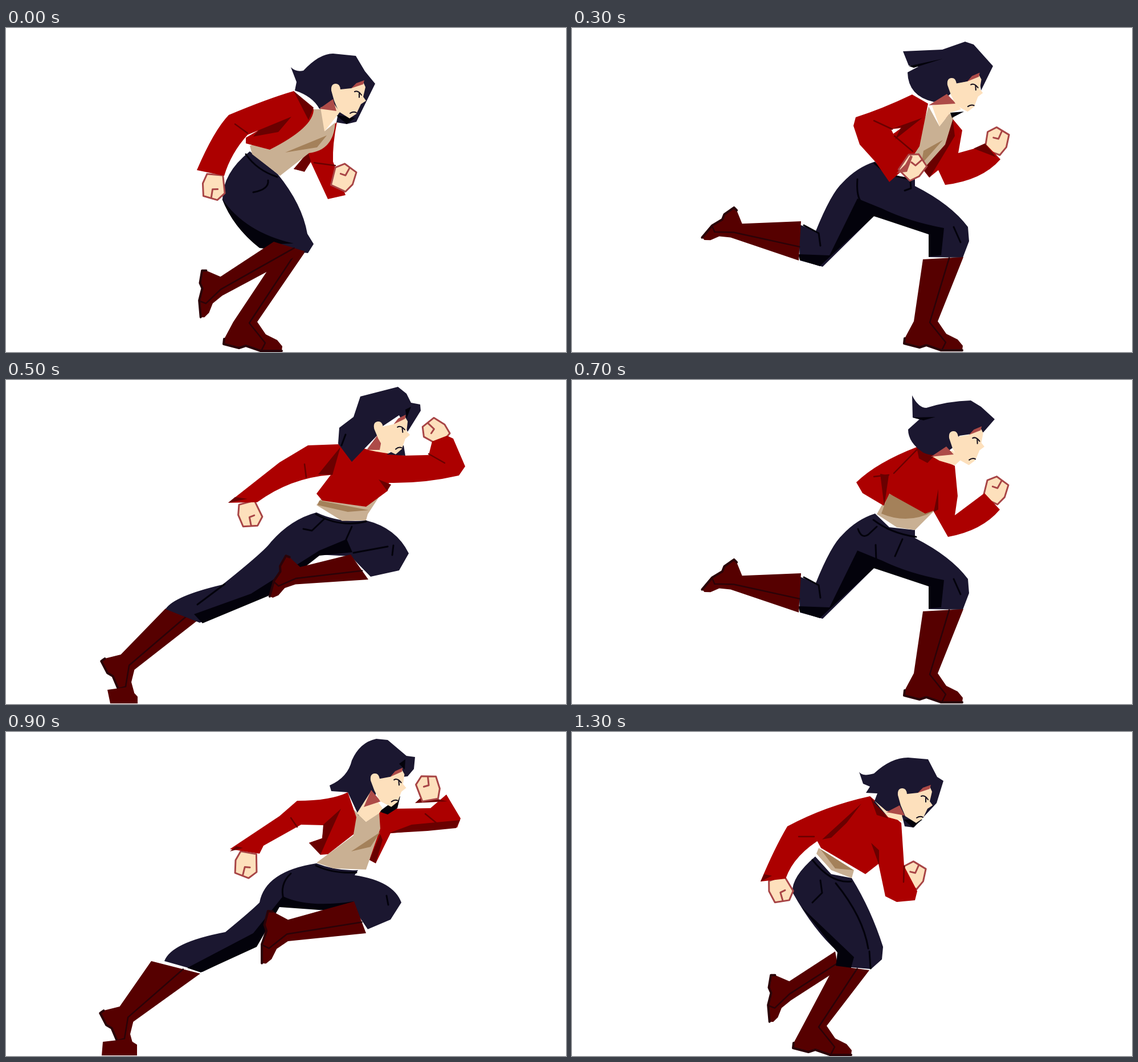
Animation, 983 px wide and 570 px high, one loop 1400 ms. Source, as an HTML page with a canvas:

```html
<!DOCTYPE html>
<html lang="en">
<head>
<meta charset="utf-8">
<title>Run cycle</title>
<style>
html, body { margin: 0; width: 100%; height: 100%; overflow: hidden; background: #fff }
canvas { display: block }
</style>
</head>
<body>
<canvas id="stage" width="983" height="570"></canvas>
<script>
const ctx = document.getElementById('stage').getContext('2d');

const fill = color => path => {
  ctx.fillStyle = color;
  ctx.fill(new Path2D(path));
};
const stroke = (color, width) => path => {
  ctx.strokeStyle = color;
  ctx.lineWidth = width;
  ctx.stroke(new Path2D(path));
};
const navy = fill('#1b1730'), dark = fill('#03020b'), red = fill('#ac0000'), shade = fill('#6a0000');
const leather = fill('#560000'), skin = fill('#fde0bc'), blush = fill('#ad4b48');
const shirt = fill('#c9b093'), tan = fill('#a4815a'), white = fill('#fff');
const line = stroke('#03020b', 3), pen = stroke('#120d1c', 2), fold = stroke('#6a0000', 2.5);
const seam = stroke('#2a0308', 2.5), sole = stroke('#2a0308', 4), knuckle = stroke('#a84546', 3);

function place(x, y, deg, paint) {
  ctx.save();
  ctx.translate(x, y);
  ctx.rotate(deg * Math.PI / 180);
  paint();
  ctx.restore();
}

// A face hung on the ear.
function head(x, y, deg) {
  place(x, y, deg, () => {
    skin('M-8 2Q-9-10 0-10 7-10 8 0L27-2 48-13 52-4 48 13 53 20 44 26 36 43 24 51 5 39-3 20Z');
    blush('M27-2L36-11 50-16 48-9Z');
    pen('M33 4Q39 1 45 10M41 7V14M25 42Q31 38 36 41');
  });
}

// A fist whose wrist is at its left when deg is 0.
function fist(x, y, deg) {
  place(x, y, deg, () => {
    const hand = 'M-21-14L10-20 23-8 18 17-4 20-21 14Z';
    skin(hand);
    knuckle(hand + 'M20 3L5 2 4-7');
  });
}

// back, front: ends of the top edge; the foot turns about the ankle.
function boot(back, front, ankle, deg = 0, size = 1) {
  const a = deg * Math.PI / 180, c = Math.cos(a) * size, s = Math.sin(a) * size;
  const at = ([x, y]) => [ankle[0] + x * c - y * s, ankle[1] + x * s + y * c];
  const heel = [[-38, 30], [-39, 39], [-12, 46], [0, 42], [26, 51], [63, 51]].map(at);
  const toe = [[64, 43], [55, 32], [35, 22], [20, 0]].map(at);
  const mid = back.map((v, i) => v * .35 + front[i] * .65);
  leather('M' + [back, at([-22, 0]), ...heel, ...toe, front].join('L') + 'Z');
  sole('M' + heel.join('L'));
  seam('M' + [mid, at([6, 2]), at([34, 37]), at([28, 49])].join('L'));
}

function passOpen() {
  boot([480, 395], [527, 391], [421, 517]);
  navy('M428 217L477 257Q520 310 529 362L540 380 530 396 445 386Q403 355 380 302 380 255 428 217Z');
  dark('M379 300Q420 360 505 379L480 380 494 393 445 387Q398 350 379 300Z');
  line('M421 222Q440 250 476 262M460 268Q462 284 434 289');
  boot([470, 376], [525, 393], [378, 455], 85, .8);
  red('M581 165Q573 205 574 235L596 294 565 301 535 236 524 252 505 248Z');
  shade('M505 248L530 218 535 234 524 253Z');
  shirt('M540 143H555L560 181 578 166Q575 215 532 220L481 260 432 222 428 207 500 185Z');
  tan('M490 219L563 189 546 210Z');
  fist(365, 279, 95);
  fist(592, 263, -65);
  red('M505 111Q460 124 391 153 365 180 335 250L383 260Q395 220 424 188L443 180 421 193V203L463 214Q540 175 540 143Z');
  shade('M443 180L501 156 478 183 434 191Z');
  shade('M505 111L540 140 531 162Z');
  fold('M402 169L424 185M541 237L578 242');
  navy('M500 69Q509 78 522 75 550 45 574 45L614 49 630 76 648 98 615 165 598 169 580 166 583 150 550 142Q538 120 507 110L510 95Z');
  dark('M579 153L613 158 598 169Z');
  skin('M552 140L575 132 586 148 559 182Z');
  blush('M550 142L574 125 580 146Z');
  head(579, 108, 0);
}

function passClosed() {
  boot([462, 386], [468, 418], [383, 456], 85, .8);
  navy('M427 219L455 250 491 257Q525 312 546 378L544 400 525 417 465 412 466 386Q425 350 387 282 385 255 427 219Z');
  dark('M402 307L495 396 489 418 463 413 466 388Z');
  line('M422 225Q455 267 490 263M436 261L439 283 422 300M463 266Q511 325 520 381M522 386L524 416');
  boot([461, 411], [522, 419], [427, 517]);
  fist(599, 252, -70);
  fist(366, 277, 70);
  shirt('M433 204L495 243 491 257 455 243 429 214Z');
  tan('M436 206L494 243 462 240Z');
  red('M523 113Q445 130 378 166 355 205 331 263L375 258Q390 215 442 185L430 191 437 204 515 250 538 232 550 289 570 299 602 296 606 280 583 236 578 160Z');
  shade('M508 126L439 189 455 186 482 160Z');
  shade('M331 263L337 250 351 253Z');
  shade('M523 113L555 152 535 146Z');
  shade('M525 195L539 208V234Z');
  fold('M398 184H425M583 236L582 264');
  navy('M504 70Q509 79 530 73 560 45 590 45L625 48 641 79 652 86 640 125 600 168 584 166 580 150 552 147 530 124 536 108 516 107 523 96 511 91Z');
  dark('M582 154L615 154 598 168Z');
  skin('M531 121L552 139 579 139 580 157 555 150Z');
  blush('M552 141L575 129 584 147Z');
  head(580, 109, 0);
}

function landLegs() {
  navy('M532 235L557 259 602 264V278Q665 310 695 350L697 375 686 404 626 403V361Q570 342 530 331L440 420 400 409 397 345 428 357Q455 290 475 272 500 245 532 235Z');
  dark('M501 300L545 318Q590 340 653 352L648 400 626 402V363L530 331 435 419 400 408 397 398 452 400Z');
  line('M407 347L433 361 436 383M670 350L682 377');
  boot([402, 340], [398, 409], [288, 357], 130, .75);
  boot([616, 407], [687, 403], [622, 516]);
}

function airLegs() {
  navy('M508 208L540 238 578 240Q660 245 712 275L735 300 722 325 690 330Q600 318 525 306L350 388 325 345 400 305Q450 230 508 208Z');
  dark('M488 286Q610 312 702 312L690 330Q600 318 525 306L350 388 343 374Z');
  line('M690 279L710 296M390 314L360 337');
  boot([688, 326], [730, 293], [761, 385], -30, .8);
  boot([326, 343], [352, 388], [216, 415], 125, .75);
}

function landOpen() {
  line('M501 266Q499 292 506 304M531 238L552 256M566 260L596 267M594 270L595 282 584 286');
  fist(745, 199, -70);
  red('M660 150L685 180 678 220 728 206 752 231Q720 268 655 276L643 250 627 263 617 250Z');
  shade('M668 158L672 190 628 263 617 250Z');
  shade('M705 212L725 203 744 227Z');
  shirt('M626 138L645 173 663 150 670 156 655 205 617 248 600 222Z');
  tan('M617 216L651 197 613 240Z');
  red('M597 117Q545 142 498 157L494 172 505 205 533 236 557 271 585 246 610 208 625 133Z');
  white('M560 178L578 176 564 186Z');
  shade('M615 158L567 196 578 174 560 178Z');
  fold('M530 163L562 178M566 190L598 217');
  fist(598, 244, -45);
  blush('M585 240L594 224 598 226 588 253 570 255Z');
  navy('M581 41L650 38 690 24 705 29 739 67 718 110 715 90 676 98Q665 125 635 130 590 120 589 78L608 68 591 66Z');
  dark('M591 67L651 54 600 70Z');
  dark('M664 149L688 147 667 158Z');
  skin('M632 137L669 126 683 143 664 149 645 173Z');
  blush('M626 136L658 116 674 133Z');
  head(667, 98, -4);
}

function landClosed() {
  line('M529 246Q560 270 604 276M502 262Q508 280 520 272L535 258M580 280L567 310M533 290L534 318');
  shirt('M555 200L600 228 634 232 602 264 570 259 535 236Z');
  tan('M556 200L635 231Q590 255 543 235Z');
  fist(743, 194, -65);
  red('M605 118L672 151 677 204 672 238 724 199 751 228Q720 265 660 276L634 230 620 235 557 200 547 221 510 199 499 180Q535 145 605 118Z');
  shade('M605 118L639 130 624 146 609 138Z');
  shade('M541 165L556 168 548 222Z');
  shade('M643 192V228L635 232Z');
  fold('M606 122L565 164M530 170L556 167');
  navy('M597 27Q608 49 622 49 660 37 700 36L718 47 742 69 722 92 680 98 672 116Q645 140 617 128 590 110 590 87L610 69 598 66Z');
  dark('M598 66L638 65 617 71Z');
  skin('M633 135L668 124 683 140 672 150 645 142Z');
  blush('M630 135L657 117 670 131Z');
  head(670, 100, -3);
}

function pushOpen() {
  boot([255, 403], [341, 425], [212, 497], 48, .85);
  leather('M170 545L214 540 230 550V569H168Z');
  navy('M545 231Q580 245 618 243L612 252Q680 262 694 300L675 330 635 347 618 322 480 302 440 375 345 422 278 403Q290 370 385 352 430 315 445 300 455 245 545 231Z');
  dark('M318 415L434 354 486 289Q530 310 610 298L618 318 480 308 440 378 342 423Z');
  line('M500 249Q479 268 488 297M544 235Q575 250 615 247M668 288L671 304');
  boot([611, 298], [632, 354], [495, 350], 90, .9);
  red('M655 140L680 135 745 134 773 110 798 152 792 168 675 178 649 231 638 225Z');
  shade('M672 178L712 163 797 155 790 169 740 174Z');
  shade('M657 180L661 190 649 231 638 225Z');
  shade('M718 125L732 112 775 122Z');
  fist(741, 99, -100);
  shirt('M611 137L632 158 655 140 657 170 632 242 575 240 545 230 610 182Z');
  tan('M606 210L657 176 640 202Z');
  fist(422, 233, 100);
  red('M600 106Q570 121 511 121L480 148 393 206 445 214 452 200 518 163 558 164 555 187 532 195 552 216 565 215 610 180 615 150Z');
  shade('M557 163L588 135 565 186 552 216 532 195 555 187Z');
  shade('M393 210L404 201 416 204Z');
  fold('M500 151L511 167M736 144L758 162');
  navy('M568 94Q600 80 607 50 621 18 650 12L670 14 703 42 718 44 716 65 705 78 660 83 648 112 619 147 600 106 571 104Z');
  dark('M690 56L701 48 700 66Z');
  dark('M655 140L692 113 687 134 670 145Z');
  skin('M640 105L661 134 655 143 632 158 616 143Z');
  blush('M641 102L658 122 628 132Z');
  head(648, 83, -5);
}

function pushClosed() {
  boot([280, 402], [340, 420], [214, 497], 48, .85);
  leather('M178 545L215 540 231 557V569H183Z');
  navy('M545 233Q585 252 632 247 685 260 707 305L690 335 640 346 605 310 545 307 460 378 340 427 280 403Q295 380 380 360 455 300 465 285 500 245 545 233Z');
  dark('M330 412L430 376 550 300 598 280 608 303 550 309 460 380 345 428Z');
  line('M544 236Q585 260 632 249M558 245L537 265 522 262M607 258L595 285M610 304L670 293M680 291L678 308M384 359L336 395');
  boot([605, 307], [636, 351], [512, 345], 105, .75);
  shirt('M553 209L632 223 665 190 635 236 632 247 590 248 545 220Z');
  tan('M550 212L637 229 600 232 547 220Z');
  fist(754, 91, -140);
  fist(428, 236, 75);
  red('M585 113L530 115 480 145 390 216 441 215Q500 172 570 167L545 200 555 212 632 223 670 195 672 181Q735 182 795 168L806 152 785 103 774 98 748 108 742 132 700 133 635 122Z');
  shade('M587 118L573 167 548 166Z');
  shade('M390 216L402 206 424 209Z');
  shade('M654 175L676 184 669 195Z');
  fold('M524 148L527 171M742 130L770 146');
  skin('M636 123L658 108 675 130 650 126Z');
  navy('M688 12L622 29 610 65 585 84 583 112 607 144 652 97 660 82 690 62 705 91 728 54 727 43 711 40 703 24Z');
  navy('M668 131L698 115 701 133Z');
  dark('M701 52L711 47 703 68Z');
  line('M596 96L589 115');
  blush('M633 123L653 96 659 107 656 123Z');
  head(654, 83, -7);
}

function air(body) {
  airLegs();
  place(-20, -25, 0, body);
}

function land(body) {
  landLegs();
  body();
}

// One pose per 100 ms beat.
const near = [passOpen, pushOpen, () => air(landOpen), () => land(landOpen)];
const far = [passClosed, pushClosed, () => air(landClosed), () => land(landClosed)];
const beats = [...near, ...far, ...near, near[3], passClosed];

const start = performance.now();
function tick() {
  const time = (performance.now() - start) % 1400;
  ctx.clearRect(0, 0, 983, 570);
  ctx.lineCap = ctx.lineJoin = 'round';
  beats[Math.floor(time / 100)]();
  requestAnimationFrame(tick);
}
tick();
</script>
</body>
</html>
```
